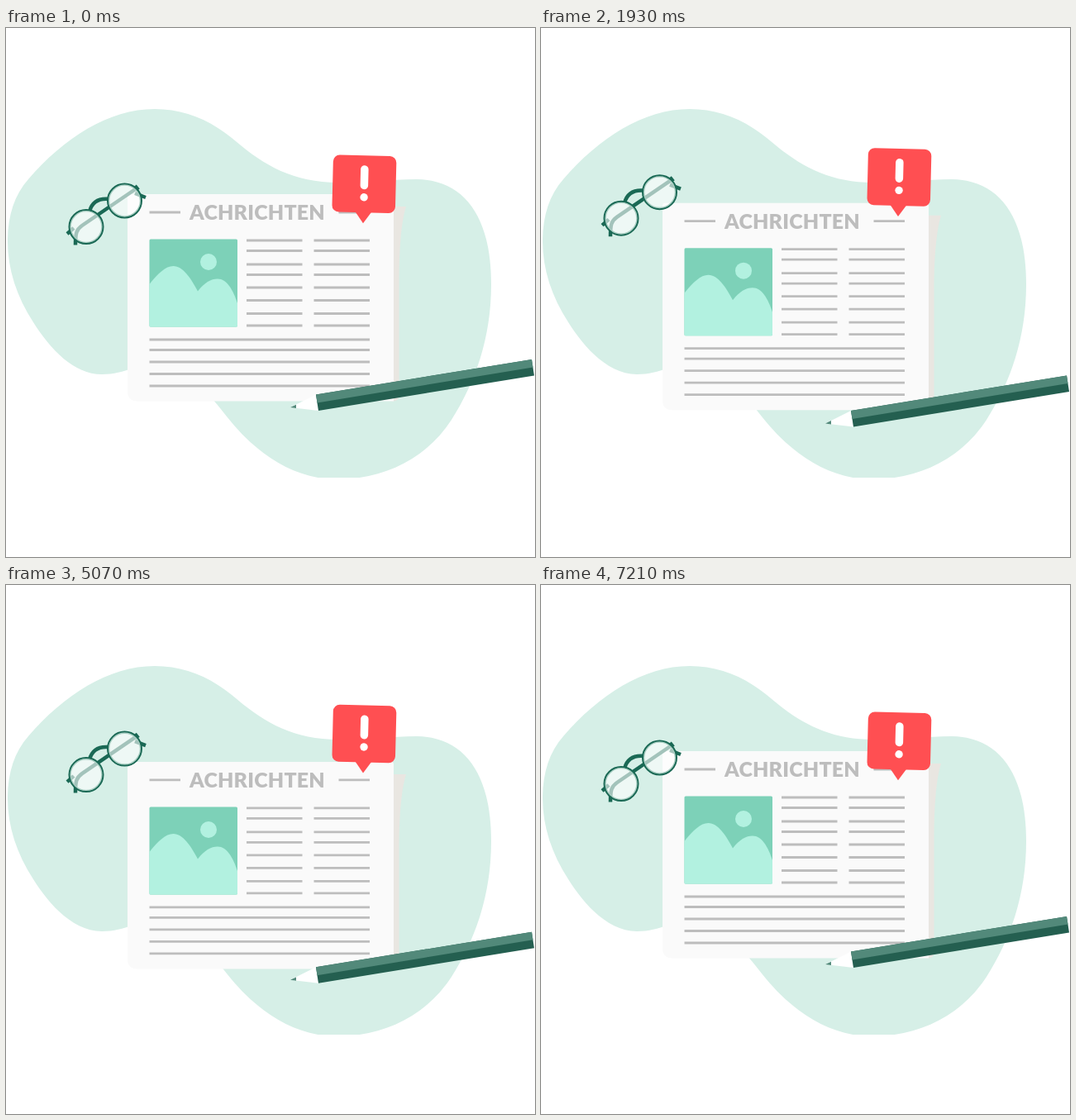
Recreate the animation shown at these times as an HTML page. Size 640 by 640 pixels, loop 7280 ms.

```html
<!DOCTYPE html>
<html lang="de">
<head>
<meta charset="utf-8">
<style>
html, body { margin: 0; width: 100%; height: 100%; overflow: hidden; background: #fff; }
svg { display: block; width: 100%; height: 100%; }
text { font: 900 25px Lato, "Open Sans", sans-serif; letter-spacing: .2px; }
</style>
</head>
<body>
<svg viewBox="0 0 640 640">
  <clipPath id="cut"><path d="M0 0H640V544H0z"/></clipPath>
  <path clip-path="url(#cut)" fill="#d6efe7" d="M2 258C2 228 10 202 27 183C70 133 124 98 180 98C218 98 250 113 278 137
    C312 166 348 187 402 187C436 187 464 183 497 183C556 184 587 230 587 310C587 375 568 428 539 474C508 522 456 546 400 546
    C346 546 300 512 267 470C240 436 215 405 180 405C163 405 145 419 116 419C82 419 54 389 33 356C13 325 2 292 2 258z"/>

  <g id="paper">
    <path fill="#e9e6e1" d="M466 216H484C478 235 475.500 270 475.500 305V443Q475.500 451.500 469 451.500H466z"/>
    <path fill="#fafafa" d="M150 201H466Q469 201 469 204V451.500H159Q147 451.500 147 439.500V204Q147 201 150 201z"/>
    <path id="lines" fill="none" stroke="#bdbdbd" stroke-width="2.800"/>
    <text x="304" y="232" text-anchor="middle" fill="#bdbdbd">ACHRICHTEN</text>
    <rect x="173.500" y="255.500" width="106.500" height="106" rx="1.500" fill="#7dd1b8"/>
    <circle cx="245" cy="283" r="10" fill="#b2f1e0"/>
    <path fill="#b2f1e0" d="M173.500 310C184 297 193 288 202.500 288C214 288 224 303 232 318.500C240 308 248 303.500 256 303.500
      C267 303.500 275 317 280 333V360Q280 361.500 278.500 361.500H175Q173.500 361.500 173.500 360z"/>
  </g>

  <g id="glasses" fill="none" stroke="#1a6955">
    <path stroke-width="4.500" d="M84 262.500C84 248 85 244 92 239L158 194M74 249L82 242M156 191L160 196M156 200L169 205M101 222C104 211 112 206 124 207"/>
    <g id="lenses"></g>
  </g>

  <g id="pencil">
    <path fill="#fff" d="M375 443.500L344 459L378 463z"/>
    <path fill="#52897a" d="M344 459L351 455.700V460z"/>
    <path fill="#245f50" d="M375 443.500L636 401L639 420.500L378 463z"/>
    <path fill="#52897a" d="M375 443.500L636 401L637.500 410.500L376.500 453.500z"/>
  </g>

  <g id="badge">
    <path fill="#ff4f52" d="M-10 -14H10L0 0z"/>
    <rect x="-38" y="-82" width="76.500" height="69" rx="8" fill="#ff4f52"/>
    <rect x="-4.500" y="-70" width="9.500" height="29" rx="4.700" fill="#fff"/>
    <circle cx=".3" cy="-31.500" r="4.700" fill="#fff"/>
  </g>
</svg>
<script>
const LOOP = 7280;
const $ = id => document.getElementById(id);
const rule = (x1, x2) => y => `M${x1} ${y}H${x2}`;

const columnRows = [257, 269.5, 286, 298.5, 314, 329.5, 345.5, 360];
const wideRows = [377, 389.5, 404, 418.5, 433];
$('lines').setAttribute('d', [
  rule(173.5, 211)(223), rule(402.5, 440)(223),
  ...columnRows.map(rule(291, 358.5)),
  ...columnRows.map(rule(372.5, 440)),
  ...wideRows.map(rule(173.5, 440))
].join(''));

$('lenses').innerHTML = [[97, 240.5], [143.5, 209]].map(([x, y]) => `
  <circle cx="${x}" cy="${y}" r="20" fill="#fff" fill-opacity=".6" stroke="none"/>
  <circle cx="${x}" cy="${y}" r="18.900" stroke="#a9cfc3" stroke-width="1.400"/>
  <circle cx="${x}" cy="${y}" r="20.500" stroke-width="2"/>`).join('');

// Eased value at time t along [time, value] keys.
function track(t, keys) {
  let [t0, v0] = keys[0];
  for (const [t1, v1] of keys) {
    if (t < t1) return v0 + (v1 - v0) * (1 - Math.cos(Math.PI * (t - t0) / (t1 - t0))) / 2;
    [t0, v0] = [t1, v1];
  }
  return v0;
}

const paperKeys = [[0, 0], [3640, 19.5], [LOOP, 0]];
const floatKeys = [[0, 0], [3500, 1], [7170, 0]];
const pencilKeys = [[0, 0], [1610, 20.8], [3530, 0], [5460, 20.8], [7240, 0]];
const tiltKeys = [[0, 1.4], [350, 1.4], [1050, -6.6], [1350, -6.6], [1850, 1.4]];

const move = (id, x, y, turn = 0) =>
  $(id).setAttribute('transform', `translate(${x} ${y}) rotate(${turn})`);

function draw() {
  const t = performance.now() % LOOP;
  const lift = track(t, floatKeys);
  move('paper', 0, track(t, paperKeys));
  move('glasses', 0, -17.8 * lift);
  move('pencil', 0, track(t, pencilKeys));
  move('badge', 432, 236.3 - 14.5 * lift, track(t, tiltKeys));
  requestAnimationFrame(draw);
}
draw();
</script>
</body>
</html>
```
